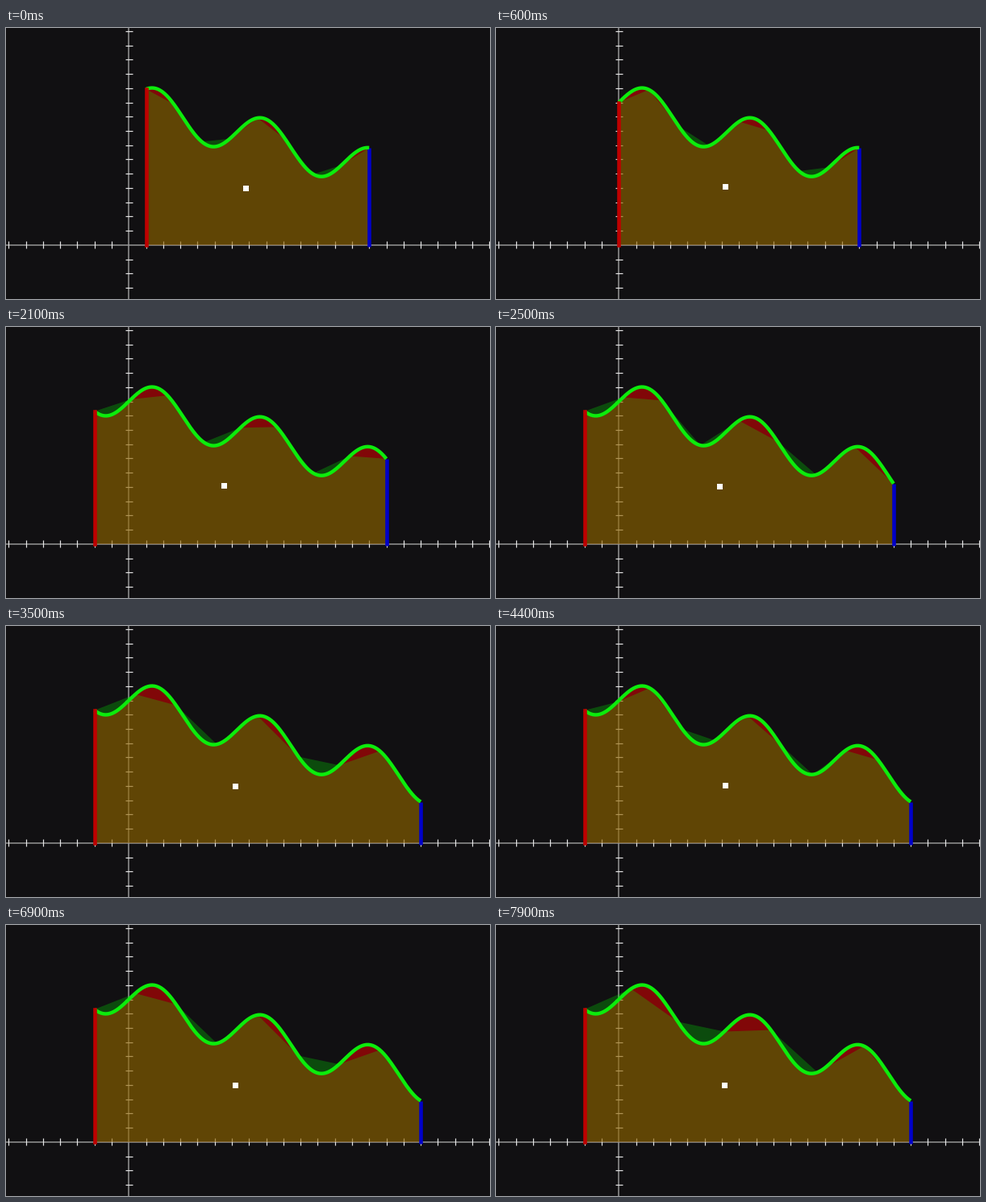
Animation, 600 px wide and 337 px high, one loop 8000 ms. Source, as a matplotlib script:

```python
import numpy as np
import matplotlib.pyplot as plt
from matplotlib.animation import FuncAnimation
from matplotlib.patches import Polygon, Rectangle

W, H, DPI = 600, 337, 100
PX = 72 / DPI               # points per pixel
OX, OY = 152.3, 269.8       # origin on the stage
UX, UY = 21.28, 17.73       # pixels per unit

# (time in ms, value) for each key press
LEFT = [(0, 1), (500, 0), (700, -1), (900, -2)]
RIGHT = [(0, 14), (1900, 15), (2300, 16), (2700, 17)]
COUNT = [(0, 8), (4100, 9), (4300, 10), (5100, 11),
         (6200, 10), (6500, 9), (6900, 8), (7200, 7)]


def f(x):
    return 10 + 1.5 * np.sin(x) - x / 3


def sx(x):
    return OX + UX * np.asarray(x)


def sy(y):
    return OY - UY * np.asarray(y)


def value_at(steps, t):
    return [v for start, v in steps if start <= t][-1]


def area_points(x):
    """Outline of the area between f sampled at x and the axis."""
    px = np.concatenate([[x[0]], x, [x[-1]]])
    py = np.concatenate([[0], f(x), [0]])
    return px, py


def centroid(x, y):
    x2, y2 = np.roll(x, -1), np.roll(y, -1)
    cross = x * y2 - x2 * y
    area = cross.sum() * 3
    return ((x + x2) * cross).sum() / area, ((y + y2) * cross).sum() / area


fig = plt.figure(figsize=(W / DPI, H / DPI), dpi=DPI, facecolor="#111012")
ax = fig.add_axes([0, 0, 1, 1])
ax.set_xlim(0, W)
ax.set_ylim(H, 0)
ax.axis("off")


def line(x, y, color, width, z, cap="butt"):
    return ax.plot(x, y, color=color, lw=width * PX, zorder=z,
                   solid_capstyle=cap)[0]


line([0, W], [OY, OY], "#989898", 1.5, 1)
line([OX, OX], [0, H], "#989898", 1.5, 1)
for i in range(-7, 22):
    if i:
        line([sx(i)] * 2, [OY - 4.5, OY + 4.5], "#e4e4e4", 1.2, 1)
for i in range(-3, 16):
    if i:
        line([OX - 4.5, OX + 4.5], [sy(i)] * 2, "#e4e4e4", 1.2, 1)
line([0, W], [H - 0.5] * 2, "black", 1, 1)

exact = ax.add_patch(Polygon([[0, 0]], fc=(0.95, 0, 0, 0.5), ec="none", zorder=2))
approx = ax.add_patch(Polygon([[0, 0]], fc=(0, 1, 0, 0.25), ec="none", zorder=2.5))
blue_bar = line([], [], "#0000c8", 4.6, 3)
curve = line([], [], "#0cec0c", 4.4, 4)
red_bar = line([], [], "#be0000", 4.6, 5, "projecting")
dot = ax.add_patch(Rectangle((0, 0), 7, 7, fc="white", ec="none", zorder=6))


def draw(k):
    t = k * 100
    a, b, n = (value_at(s, t) for s in (LEFT, RIGHT, COUNT))

    x = np.linspace(a, b, 300)
    px, py = area_points(x)
    exact.set_xy(np.column_stack([sx(px), sy(py)]))
    curve.set_data(sx(x), sy(f(x)))

    px, py = area_points(np.linspace(a, b, n + 1))
    approx.set_xy(np.column_stack([sx(px), sy(py)]))
    cx, cy = centroid(px, py)
    dot.set_xy((round(float(sx(cx)) - 3.5), round(float(sy(cy)) - 3.5)))

    red_bar.set_data([sx(a)] * 2, [sy(f(a)), OY])
    blue_bar.set_data([sx(b)] * 2, [sy(f(b)), OY + 2])
    return exact, approx, blue_bar, curve, red_bar, dot


anim = FuncAnimation(fig, draw, frames=80, interval=100, repeat=True,
                     repeat_delay=0, init_func=lambda: draw(0))
plt.show()
```
